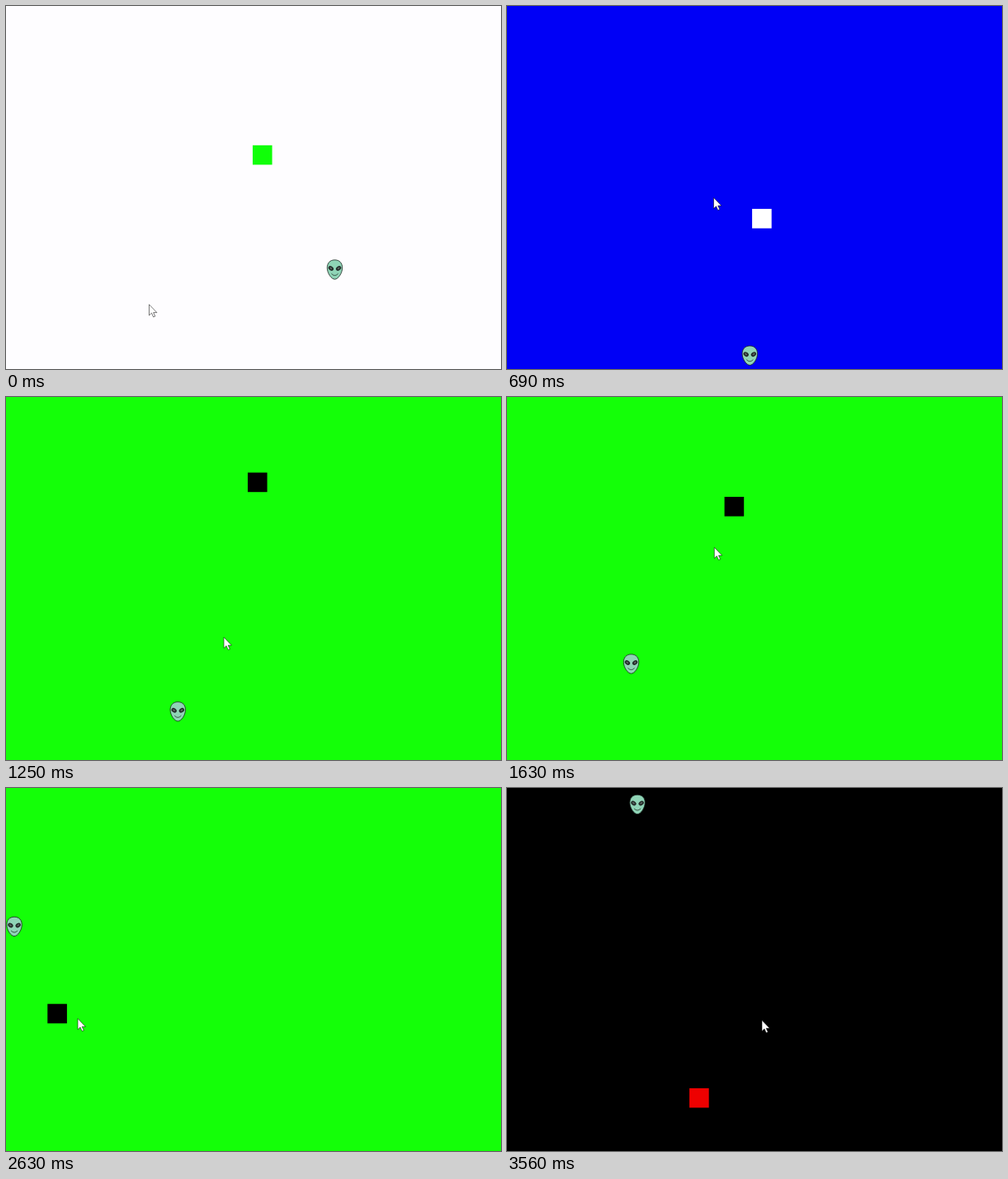
Animation, 600 px wide and 440 px high, one loop 3620 ms. Source, as an HTML page with a canvas:

```html
<!DOCTYPE html>
<html lang="en">
<head>
<meta charset="utf-8">
<title>Catch the square</title>
<style>
  html, body { margin: 0; width: 100%; height: 100%; overflow: hidden; }
  canvas { display: block; }
</style>
</head>
<body>
<canvas id="stage" width="600" height="440"></canvas>
<script>
const ctx = document.getElementById('stage').getContext('2d');
const LOOP = 3620, TICK = 62.5, LAST_TICK = 57, SPEED = 4.9, SIZE = 23.6;

// Each catch starts a round: the square appears at (x, y) and drifts down-left.
const rounds = [
  { start: 0,  x: 299, y: 168.8, back: '#fefdff', fill: '#10ff08' },
  { start: 10, x: 302, y: 241,   back: '#0000f6', fill: '#ffffff' },
  { start: 20, x: 293, y: 91.6,  back: '#14ff08', fill: '#000000' },
  { start: 29, x: 114, y: 198,   back: '#14ff08', fill: '#000000' },
  { start: 46, x: 275, y: 310,   back: '#000000', fill: '#ee0000' }
];

// Places where the hand slows down: tick, x, y.
const stops = [
  [0, 173.5, 361.8], [11, 250.5, 232.3], [19, 264.8, 297.6],
  [26, 251.3, 182.3], [36, 242, 165], [42, 87, 279.5],
  [48, 24.7, 305.5], [54, 344.5, 300], [57, 309, 281.5]
];

function cursorAt(tick) {
  const i = Math.max(1, stops.findIndex(s => s[0] >= tick));
  const [t0, x0, y0] = stops[i - 1], [t1, x1, y1] = stops[i];
  const f = (tick - t0) / (t1 - t0), ease = f * f * (3 - 2 * f);
  return [x0 + (x1 - x0) * ease, y0 + (y1 - y0) * ease];
}

// The alien flies diagonally, gains a little speed, and bounces off two walls.
function alienAt(tick) {
  const travel = 9.42 * tick + 0.0045 * tick * tick;
  const left = 2.5, bottom = 445.5;
  return [left + Math.abs(396 - travel), bottom - Math.abs(126 - travel)];
}

const head = new Path2D('M0 -11.7C6 -11.7 9.2 -7.6 9.2 -2.2C9.2 4.5 4 11.7 0 11.7C-4 11.7 -9.2 4.5 -9.2 -2.2C-9.2 -7.6 -6 -11.7 0 -11.7Z');
const smile = new Path2D('M-4 5Q0 9.2 4 5');
const arrow = new Path2D('M0 0V13.2L3 10.4L5.2 15.2L7.3 14.3L5.2 9.8H9.4Z');

function outline(path, color, width) {
  ctx.strokeStyle = color;
  ctx.lineWidth = width;
  ctx.stroke(path);
}

function at([x, y], draw) {
  ctx.save();
  ctx.translate(x, y);
  draw();
  ctx.restore();
}

function drawOval(x, y, rx, ry, angle, color) {
  ctx.fillStyle = color;
  ctx.beginPath();
  ctx.ellipse(x, y, rx, ry, angle, 0, 2 * Math.PI);
  ctx.fill();
}

function drawAlien() {
  ctx.fillStyle = '#8fd4b6';
  ctx.fill(head);
  outline(head, '#17231e', 0.8);
  for (const side of [-1, 1]) {
    drawOval(side * 4.6, -1.5, 3.4, 2.5, side * -0.6, '#222b28');
    drawOval(side * 4.7, -1.7, 1.7, 1, side * -0.6, '#5a6561');
  }
  outline(smile, '#24352d', 0.8);
}

function drawCursor() {
  ctx.fillStyle = '#ffffff';
  ctx.fill(arrow);
  outline(arrow, 'rgba(0, 0, 0, 0.75)', 0.7);
}

function frame(now) {
  const tick = Math.min(LAST_TICK, Math.floor((now % LOOP + 3) / TICK));
  const round = rounds.findLast(r => r.start <= tick);
  const drift = (tick - round.start) * SPEED;

  ctx.fillStyle = round.back;
  ctx.fillRect(0, 0, 600, 440);
  ctx.fillStyle = round.fill;
  ctx.fillRect(round.x - drift, round.y + drift, SIZE, SIZE);
  at(alienAt(tick), drawAlien);
  at(cursorAt(tick), drawCursor);
  requestAnimationFrame(frame);
}
frame(performance.now());
</script>
</body>
</html>
```
